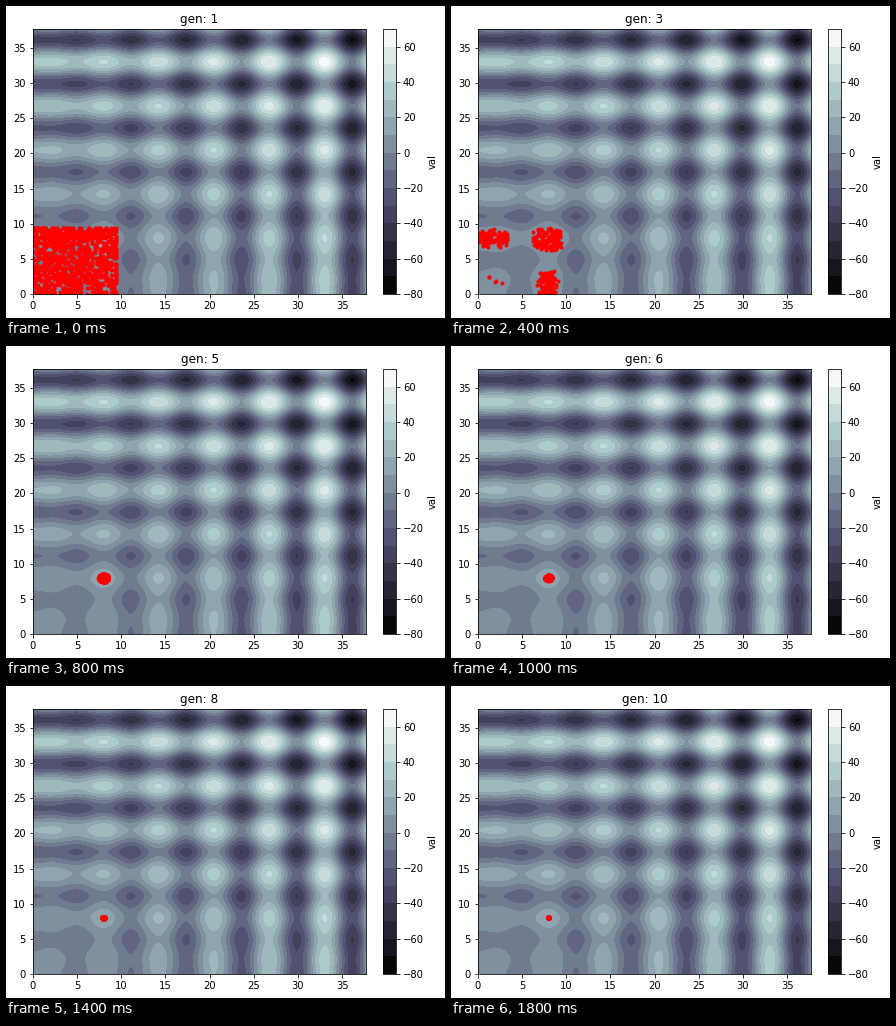
Animation of 439x312 px, one loop 2 s. Source, as a matplotlib script:

```python
import numpy as np
import matplotlib.pyplot as plt
from matplotlib.animation import FuncAnimation

W, H, DPI = 439, 312, 72
LIMIT = 12 * np.pi
SPAN = 3 * np.pi          # side of the starting square
CELLS = 32                # starting positions per axis
PEAK = 7.979              # local maximum of gain() inside the square
GENERATIONS = 10
RADII = [1.15, 0.57, 0.38, 0.23, 0.15, 0.10, 0.07]

plt.rcParams.update({"font.family": "DejaVu Sans", "font.size": 10})


def gain(v):
    return v * np.sin(v)


def box(left, top, right, bottom):
    """Pixel edges, measured from the top left, as figure fractions."""
    return [left / W, 1 - bottom / H, (right - left) / W, (bottom - top) / H]


def survivors(rng, low, ramp, floor, count=1500):
    """Keep uniform samples with a chance that grows with their fitness."""
    x, y = rng.uniform(0, SPAN, (2, count))
    chance = np.clip((gain(x) + gain(y) - low) / ramp, 0, 1) ** 2
    keep = rng.random(count) < chance
    keep &= np.minimum(gain(x), gain(y)) > floor
    return x[keep], y[keep]


def cluster(rng, radius, count=400):
    r = radius * np.sqrt(rng.random(count))
    a = rng.uniform(0, 2 * np.pi, count)
    return PEAK + r * np.cos(a), PEAK + r * np.sin(a)


def population(gen):
    rng = np.random.default_rng(gen)
    if gen == 1:
        return rng.integers(0, CELLS, (2, 1200)) * SPAN / (CELLS - 1)
    if gen == 2:
        return survivors(rng, low=-4, ramp=9, floor=-5)
    if gen == 3:
        return survivors(rng, low=1.5, ramp=7, floor=-0.7)
    return cluster(rng, RADII[gen - 4])


fig = plt.figure(figsize=(W / DPI, H / DPI), dpi=DPI, facecolor="white")
ax = fig.add_axes(box(27, 23, 360, 288))
bar_ax = fig.add_axes(box(377, 23, 390, 288))

grid = np.linspace(0, LIMIT, 300)
X, Y = np.meshgrid(grid, grid)
field = ax.contourf(X, Y, gain(X) + gain(Y), np.arange(-80, 71, 10), cmap="bone")
bar = fig.colorbar(field, cax=bar_ax, ticks=np.arange(-80, 61, 20))
bar.set_label("val")

ax.set(xlim=(0, LIMIT), ylim=(0, LIMIT),
       xticks=range(0, 36, 5), yticks=range(0, 36, 5))
title = ax.set_title("gen: 1", fontsize=12)
dots, = ax.plot([], [], "o", color="red", markersize=3, markeredgewidth=1)


def update(frame):
    gen = frame + 1
    title.set_text(f"gen: {gen}")
    dots.set_data(*population(gen))
    return title, dots


anim = FuncAnimation(fig, update, frames=GENERATIONS, interval=200, repeat=True)
plt.show()
```
